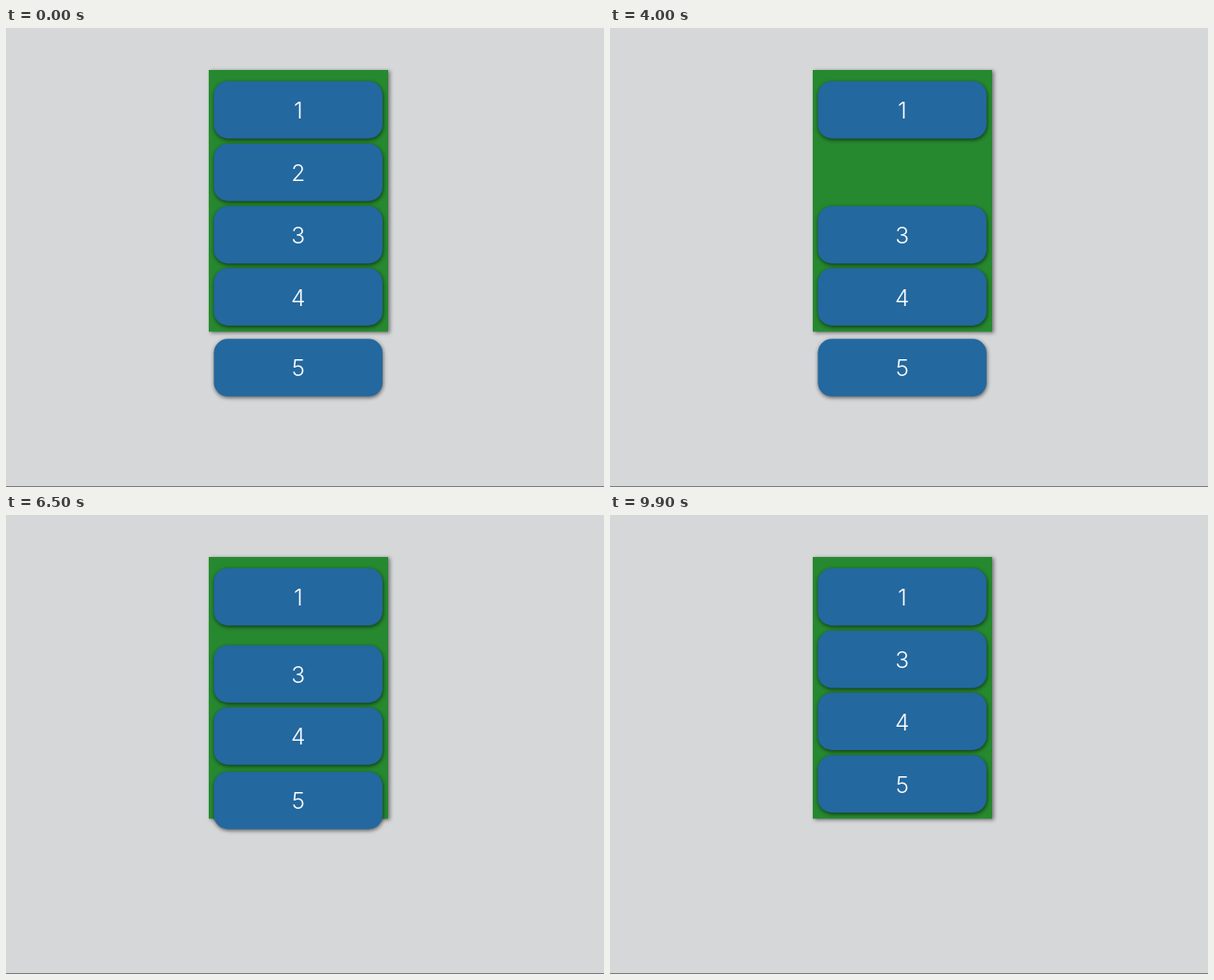
An HTML page with a canvas for the animation above (10000 ms loop, 640x492 px).

```html
<!DOCTYPE html>
<html lang="en">
<head>
<meta charset="utf-8">
<title>Removing a card from a list</title>
<style>
  html, body { margin: 0; width: 100%; height: 100%; overflow: hidden; background: #d5d7d9; }
  canvas { display: block; }
</style>
</head>
<body>
<canvas id="stage" width="640" height="492"></canvas>
<script>
const ctx = document.getElementById('stage').getContext('2d');
const LOOP = 10000, STEP = 100;
const CARD = { x: 222.5, w: 180.5, h: 61.5, r: 15 };

// Progress from 0 to 1 with a sine ease in and out
function ease(t, start, duration) {
  const u = Math.min(1, Math.max(0, (t - start) / duration));
  return (1 - Math.cos(Math.PI * u)) / 2;
}

function setShadow(color, blur, x, y) {
  ctx.shadowColor = color;
  ctx.shadowBlur = blur;
  ctx.shadowOffsetX = x;
  ctx.shadowOffsetY = y;
}

function drawPanel() {
  setShadow('rgba(0,0,0,0.45)', 4, 1.5, 1);
  ctx.fillStyle = '#26892f';
  ctx.fillRect(217, 45, 192, 280.5);
}

function drawCard(label, y, dx = 0) {
  const x = CARD.x + dx;
  setShadow('rgba(0,0,0,0.6)', 4, 0.5, 1.5);
  ctx.fillStyle = '#23689f';
  ctx.beginPath();
  ctx.roundRect(x, y, CARD.w, CARD.h, CARD.r);
  ctx.fill();
  setShadow('transparent', 0, 0, 0);
  ctx.fillStyle = '#fff';
  ctx.fillText(label, x + CARD.w / 2, y + 40);
}

function draw(t) {
  const out = ease(t, 1340, 2490);
  const up = ease(t, 4810, 2490);

  setShadow('transparent', 0, 0, 0);
  ctx.fillStyle = '#d5d7d9';
  ctx.fillRect(0, 0, 640, 492);
  ctx.fillStyle = '#77797b';
  ctx.fillRect(0, 491, 640, 1);

  ctx.font = '300 24.5px Inter, Roboto, "Liberation Sans", sans-serif';
  ctx.textAlign = 'center';
  drawPanel();
  drawCard('1', 57);
  drawCard('3', 191 - 67 * up);
  drawCard('4', 257.5 - 67 * up);
  drawCard('5', 333.3 - 75.8 * up);
  if (out < 1) drawCard('2', 124, 424 * out);
}

const begin = performance.now();
function tick() {
  const t = (performance.now() - begin) % LOOP;
  draw(Math.floor(t / STEP) * STEP);
  requestAnimationFrame(tick);
}
tick();
</script>
</body>
</html>
```
